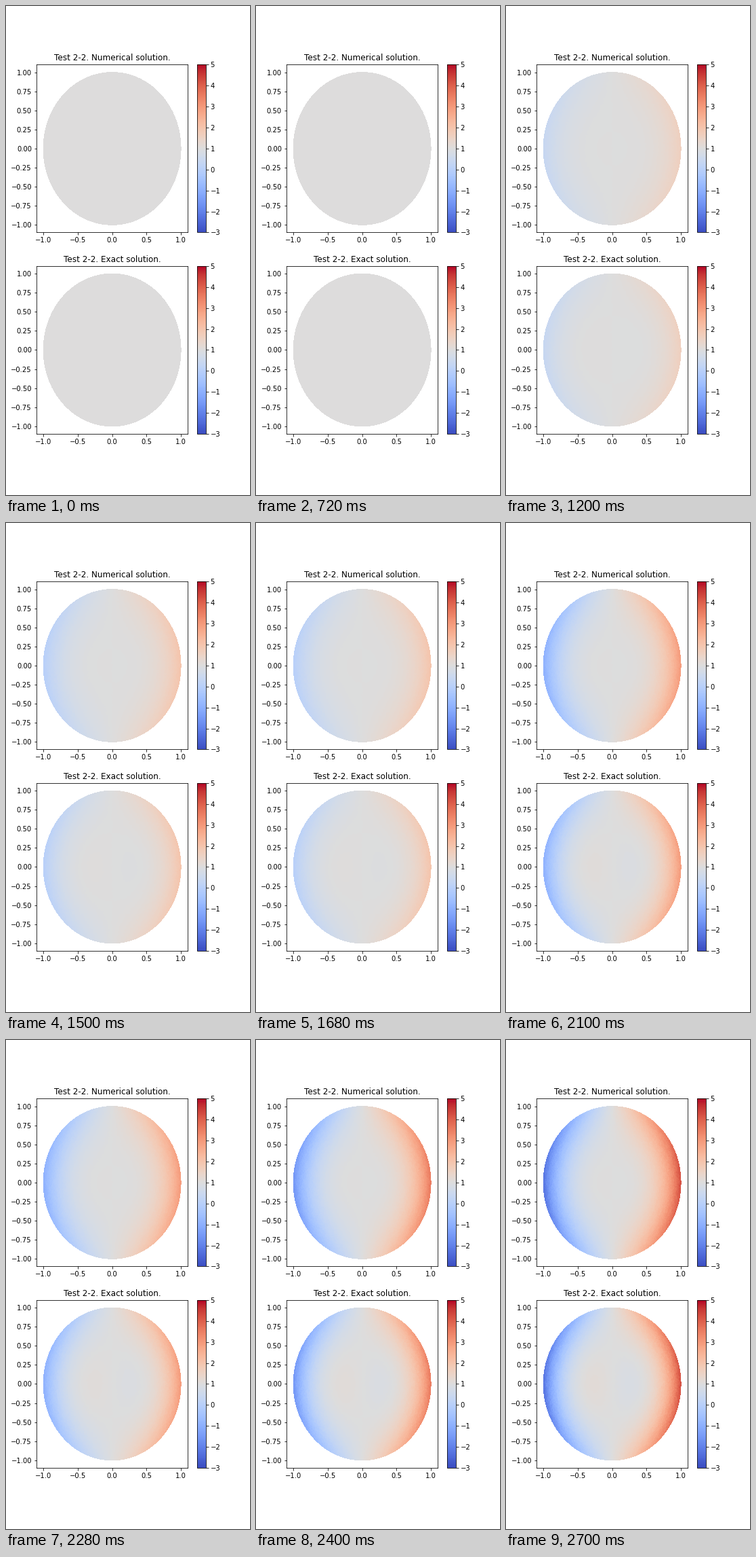
A matplotlib script that plays this animation: 360 by 720 pixels, repeating every 3 s.

```python
import numpy as np
import matplotlib.pyplot as plt
from matplotlib.animation import FuncAnimation
from matplotlib.tri import Triangulation

STEPS, INTERVAL, HOLD = 10, 300, 4
RINGS = 40
GROWTH = 0.0407

plt.rcParams.update({"font.family": "DejaVu Sans", "font.size": 10})


def disk_mesh(rings, seed=3):
    """Slightly irregular triangle mesh of the unit disk."""
    rng = np.random.default_rng(seed)
    pts = [np.zeros((1, 2))]
    for i in range(1, rings + 1):
        count = 6 * i
        angle = 2 * np.pi * np.arange(count) / count
        ring = i / rings * np.column_stack([np.cos(angle), np.sin(angle)])
        if i < rings:
            ring += rng.uniform(-0.25, 0.25, ring.shape) / rings
        pts.append(ring)
    return Triangulation(*np.vstack(pts).T)


def profile(mesh, core):
    """Odd field x(r^2 - core), scaled to 1 at the rim, averaged per triangle."""
    r2 = mesh.x**2 + mesh.y**2
    f = mesh.x * (r2 - core) / (1 - core)
    return f[mesh.triangles].mean(axis=1)


def amplitude(step):
    return GROWTH * step**2 if step >= HOLD else 0.0


def add_panel(ax, mesh, title):
    image = ax.tripcolor(mesh, facecolors=np.ones(len(mesh.triangles)),
                         cmap="coolwarm", vmin=-3, vmax=5)
    ax.set(xlim=(-1.1, 1.1), ylim=(-1.1, 1.1), title=title,
           xticks=np.linspace(-1, 1, 5), yticks=np.linspace(-1, 1, 9))
    ax.xaxis.set_major_formatter("{x:.1f}")
    ax.yaxis.set_major_formatter("{x:.2f}")
    fig.colorbar(image, ax=ax, ticks=range(-3, 6))
    return image


fig, axes = plt.subplots(2, 1, figsize=(5, 10), dpi=72)
fig.subplots_adjust(left=0.125, right=0.9, bottom=0.125, top=0.88, hspace=0.2)

mesh = disk_mesh(RINGS)
panels = [
    (add_panel(axes[0], mesh, "Test 2-2. Numerical solution."), profile(mesh, 0.05)),
    (add_panel(axes[1], mesh, "Test 2-2. Exact solution."), profile(mesh, 0.2)),
]


def update(step):
    for image, shape in panels:
        image.set_array(1 + amplitude(step) * shape)
    return [image for image, _ in panels]


anim = FuncAnimation(fig, update, frames=STEPS, interval=INTERVAL,
                     repeat=True, repeat_delay=0, blit=False)
plt.show()
```
